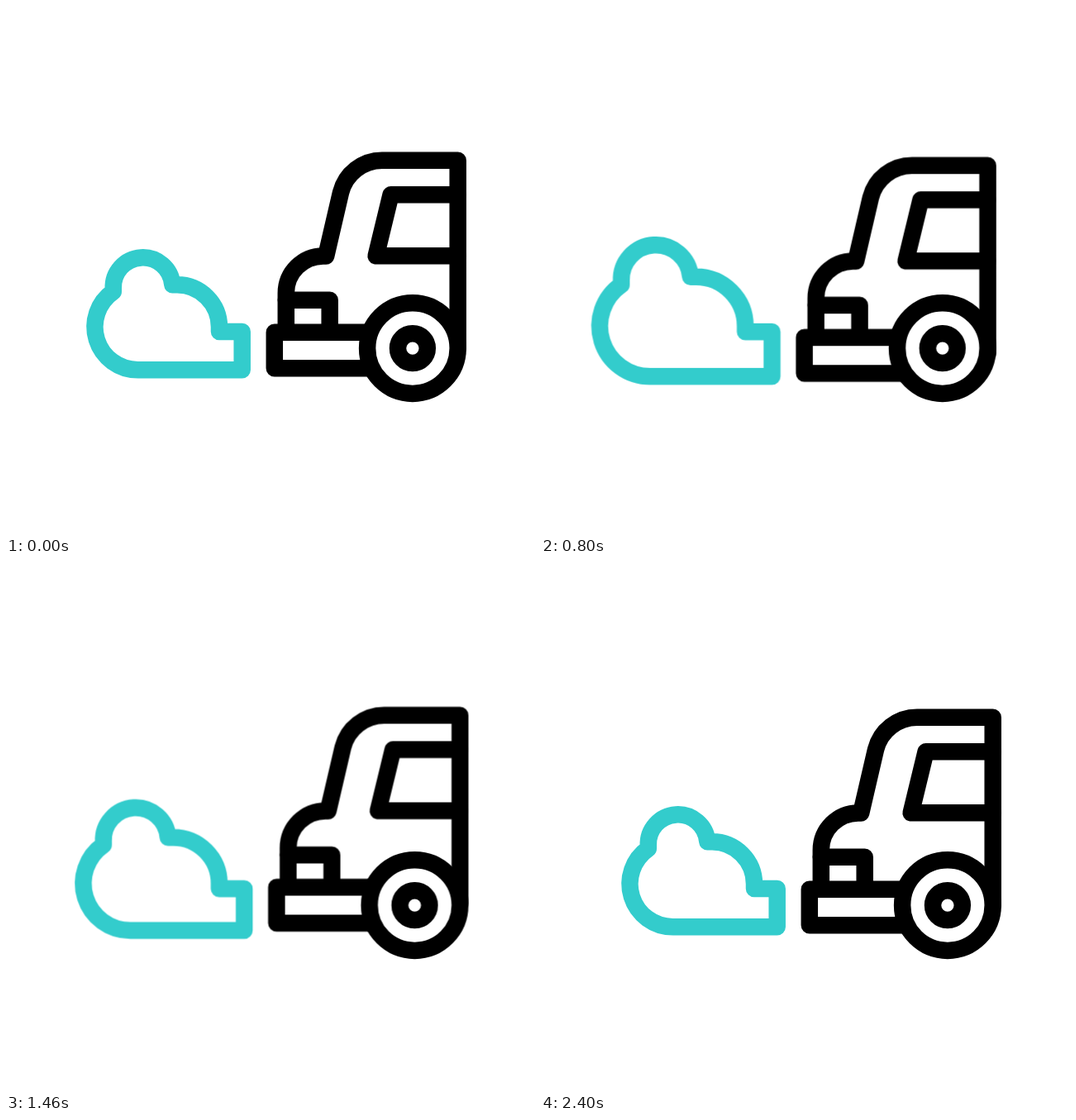
An HTML page for the animation above (2420 ms loop, 640 by 640 pixels).

```html
<!DOCTYPE html>
<html lang="en">
<head>
<meta charset="utf-8">
<title>Truck and cloud</title>
<style>
  html, body { margin: 0; height: 100%; overflow: hidden; background: #fff; }
  svg {
    display: block;
    width: 640px;
    height: 640px;
    fill: none;
    stroke: #000;
    stroke-width: 20.5;
    stroke-linecap: round;
    stroke-linejoin: round;
  }
  .scene, .body, .cloud { animation: 2420ms cubic-bezier(.3333, 0, .6667, 1) infinite; }
  .scene { animation-name: drive; }
  .body { animation-name: bounce; }
  .cloud {
    stroke: #3cc;
    vector-effect: non-scaling-stroke;
    transform-origin: 285.7px 394.1px;
    animation-name: puff;
  }

  /* Stops at 600, 1200, 1800 and 2400 ms, then a short rest */
  @keyframes drive {
    0%, 99.174%, 100% { transform: translateX(0); }
    24.793%, 74.38% { transform: translateX(-13px); }
    49.587% { transform: translateX(13px); }
  }
  @keyframes bounce {
    0%, 99.174%, 100% { transform: translateY(0); }
    24.793%, 74.38% { transform: translateY(13px); }
    49.587% { transform: translateY(-13px); }
  }
  @keyframes puff {
    0%, 49.587%, 99.174%, 100% { transform: scale(1); }
    24.793%, 74.38% { transform: scale(1.23); }
  }
</style>
</head>
<body>
<svg viewBox="0 0 640 640">
  <g class="scene">
    <path class="cloud" d="M285.7 394.1V440.2H159.5A52 52 0 0 1 129.8 345.5V341.8A35.83 35.83 0 0 1 201.3 337.2H207A51 51 0 0 1 258 388.2V394.1Z"/>
    <g class="body">
      <path d="M546.7 414V186.8H455A51.5 51.5 0 0 0 405 225.8L387.2 302.4H383.8A45 45 0 0 0 338.8 347.4V394.8"/>
      <path d="M546.7 228.2H465.6L447.6 302.3H546.7"/>
      <path d="M338.8 355.7H391.7V394.8"/>
      <path d="M440.7 394.8H324.8V438.2H442.8"/>
    </g>
    <circle cx="491.9" cy="414.1" r="54.8" fill="#fff"/>
    <circle cx="491.9" cy="414.1" r="17.9"/>
  </g>
</svg>
</body>
</html>
```
